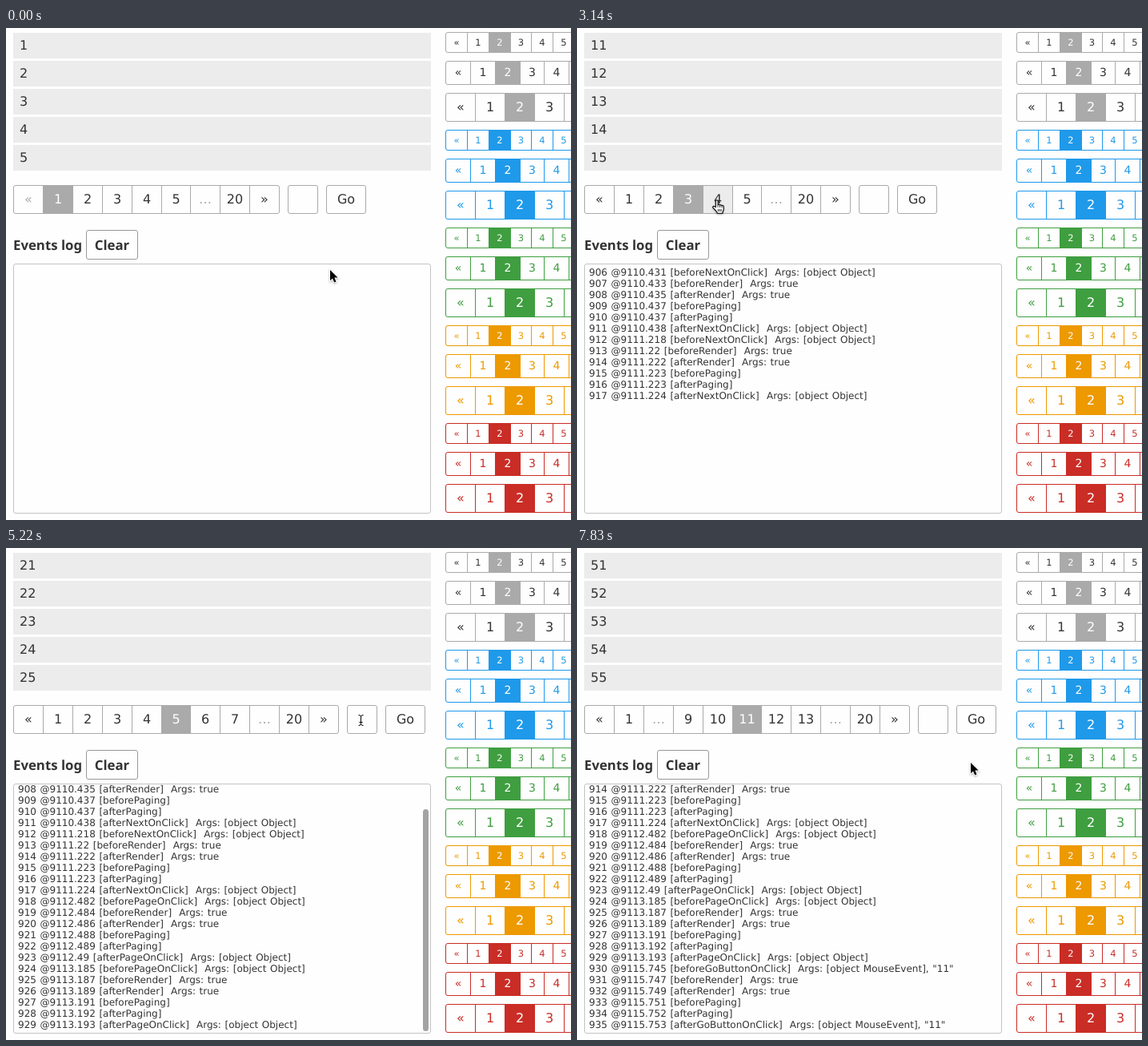
Recreate the animation shown at these times as an HTML page. Size 706 by 614 pixels, loop 8000 ms.

```html
<!DOCTYPE html>
<html lang="en">
<head>
<meta charset="utf-8">
<title>Pagination demo</title>
<style>
  html, body { margin: 0; width: 100%; height: 100%; overflow: hidden; background: #fefefe; }
  body { position: relative; color: #333; font: 16px "DejaVu Sans", sans-serif; text-rendering: geometricPrecision; }
  body * { box-sizing: border-box; }
  .abs, .row, .pager, .cell, .box { position: absolute; }
  .row { left: 9px; width: 522px; height: 32px; padding-left: 8px; line-height: 32px; background: #ececec; }
  .pager { --tone: #aaa; border: 1px solid var(--tone); border-radius: 3px; overflow: hidden; }
  .cell { top: 0; height: 100%; border-left: 1px solid var(--tone); text-align: center; }
  .cell:first-child { border-left-color: transparent; }
  .cell.hover { background: #ececec; }
  .cell.off { color: #aaa; }
  .cell.on { background: var(--tone); color: #fff; }
  .box { border: 1px solid #aaa; border-radius: 3px; text-align: center; }
  #input, #go { top: 196px; height: 36px; line-height: 34px; }
  #input { width: 38px; color: #000; }
  #go { width: 50px; }
  #go.hover { background: #fafafa; }
  .bold { font: bold 16.8px "Noto Sans", sans-serif; }
  #title { left: 9px; top: 252px; line-height: 37px; white-space: nowrap; }
  #clear { left: 100px; top: 252px; width: 65px; height: 37px; line-height: 35px; border-color: #999; }
  #log { left: 9px; top: 294px; width: 522px; height: 312px; overflow: hidden; text-align: left; border-color: #c4c4c4; }
  #lines { left: 5px; top: 3px; margin: 0; font: 12px/14px "DejaVu Sans", sans-serif; word-spacing: .8px; }
  #thumb { left: 521px; width: 7px; border-radius: 4px; background: #777; }
  #cursor { left: 0; top: 0; width: 20px; height: 24px; overflow: visible; }
  .shadow { filter: drop-shadow(0 1px 1px rgba(0,0,0,.3)); }
</style>
</head>
<body>
<div id="rows"></div>
<div id="pager" class="pager"></div>
<div id="input" class="box"></div>
<div id="go" class="box">Go</div>
<div id="title" class="abs bold">Events log</div>
<div id="clear" class="box bold">Clear</div>
<div id="log" class="box"><pre id="lines" class="abs"></pre></div>
<div id="thumb" class="abs"></div>
<div id="themes"></div>
<svg id="cursor" class="abs">
  <path data-kind="arrow" class="shadow" d="M0 0v13.2l3-2.8 2.2 5 2.3-1-2.1-4.9h4.2z" stroke="#fff" stroke-width="2" paint-order="stroke"/>
  <g data-kind="hand" class="shadow" transform="translate(-5 -1)" stroke="#000" stroke-width="1.1" stroke-linejoin="round">
    <path fill="#fff" d="M4.3 9.6V2.2a1.4 1.4 0 0 1 2.8 0V6.8c.5-.8 2.2-.7 2.5.3.6-.7 2-.5 2.4.6.8-.6 2.2-.1 2.2 1.3v3c0 2.4-1.4 3-1.4 5.2H6.3C5.9 15.2 2.6 12.4.9 10.2c-.8-1.3.8-2.3 1.9-1.5z"/>
    <path fill="none" d="M7.1 6.8v3M9.6 7.2v2.8M12 7.8v2.4M7.4 12v3M9.3 12v3M11.2 12v3" stroke-width=".8"/>
  </g>
  <path data-kind="beam" fill="none" stroke="#000" d="M-2.5-6.5q3 0 3 2v9q0 2-3 2M3.5-6.5q-3 0-3 2v9q0 2 3 2M-1.5 2.5h4"/>
</svg>
<script>
const LOOP = 8000, STEP = 150, PITCH = 36.9, LAST = 20;
const $ = id => document.getElementById(id);

// time, page, control, first log stamp in ms, duration in ms
const clicks = [
  [1340, 2, 'Next', 9110431, 7],
  [2090, 3, 'Next', 9111218, 6],
  [3440, 4, 'Page', 9112482, 8],
  [4180, 5, 'Page', 9113185, 8],
  [6840, 11, 'GoButton', 9115745, 8]
];

// start, end, target x, target y, downward bend
const moves = [
  [450, 1040, 327, 219, 0],
  [2690, 3140, 174, 215, 22],
  [3590, 3890, 207, 217, 0],
  [4330, 5220, 443, 215, 20],
  [6120, 6550, 503, 231, 0],
  [7140, 7580, 492, 268, 0]
];

// when the scrollbar appears and when it has faded out
const scrolls = [[4180, 5520], [6840, 7830]];
const FADE = 450;

const ENTRY = '11', TYPE_START = 5820, TYPE_END = 6840;

function cursorAt(t) {
  let x = 405, y = 302;
  for (const [start, end, toX, toY, bend] of moves) {
    if (t < start) break;
    const count = Math.round((end - start) / STEP) + 1;
    const p = Math.min(1, (Math.floor((t - start + 10) / STEP) + 1) / count);
    const eased = Math.sin(p * Math.PI / 2);
    x += (toX - x) * eased;
    y += (toY - y) * eased + bend * Math.sin(p * Math.PI);
  }
  return [Math.round(x), Math.round(y)];
}

function typedAt(t) {
  if (t < TYPE_START || t >= TYPE_END) return '';
  return ENTRY.slice(0, Math.floor((t - TYPE_START) / STEP) + 1);
}

function thumbOpacity(t) {
  const span = scrolls.find(([start, end]) => t >= start && t < end);
  if (!span) return 0;
  const left = Math.ceil((span[1] - t) / STEP) * STEP;
  return Math.min(1, left / FADE);
}

function labels(page) {
  const first = Math.max(1, page - 2), end = Math.max(5, page + 2);
  const list = ['«'];
  if (first > 3) list.push(1, '…');
  else for (let i = 1; i < first; i++) list.push(i);
  for (let i = first; i <= end; i++) list.push(i);
  return list.concat('…', LAST, '»');
}

function cells(list, pitch, page, hover) {
  return list.map((text, i) => {
    const x = Math.round(i * pitch), w = Math.round((i + 1) * pitch) - x;
    const off = text === '…' || (text === '«' && page === 1);
    const kind = text === page ? 'on' : off ? 'off' : i === hover ? 'hover' : '';
    return `<div class="cell ${kind}" style="left:${x - 1}px;width:${w}px">${text}</div>`;
  }).join('');
}

function placePager(el, x, y, w, h) {
  el.style.cssText += `;left:${x}px;top:${y}px;width:${w}px;height:${h}px;line-height:${h - 2}px`;
}

function logLines(done) {
  let id = 906;
  return done.flatMap(([, page, name, base, span]) => {
    const args = name === 'GoButton' ? `[object MouseEvent], "${page}"` : '[object Object]';
    const events = [
      [`before${name}OnClick`, args], ['beforeRender', 'true'], ['afterRender', 'true'],
      ['beforePaging'], ['afterPaging'], [`after${name}OnClick`, args]
    ];
    return events.map(([event, arg], i) => {
      const delay = i < 5 ? Math.min(2 * i, span - 1) : span;
      return `${id++} @${(base + delay) / 1000} [${event}]` + (arg ? `  Args: ${arg}` : '');
    });
  });
}

function drawThemes() {
  const tones = ['#aaa', '#1f99ea', '#3f9e40', '#ed9900', '#c92d26'];
  // top, height, cell pitch, font size
  const sizes = [[5, 26, 26.85, 11.5], [41, 30, 30.86, 14], [81, 36, PITCH, 16]];
  tones.forEach((tone, group) => sizes.forEach(([y, h, pitch, font]) => {
    const el = document.createElement('div');
    el.className = 'pager';
    el.style.cssText = `--tone:${tone};font-size:${font}px;color:${group ? tone : '#333'}`;
    placePager(el, 549, y + group * 122, 300, h);
    el.innerHTML = cells(['«', 1, 2, 3, 4, 5, '…'], pitch, 2);
    $('themes').append(el);
  }));
}

let shown = '';
function draw(t) {
  const done = clicks.filter(c => c[0] <= t);
  const page = done.length ? done[done.length - 1][1] : 1;
  const [x, y] = cursorAt(t);
  const text = typedAt(t), opacity = thumbOpacity(t);
  const hidden = t >= TYPE_START && t < TYPE_START + ENTRY.length * STEP;
  const key = [page, x, y, text, opacity, hidden].join();
  if (key === shown) return;
  shown = key;

  const list = labels(page), width = Math.round(list.length * PITCH) + 1;
  const inputX = 9 + width + 10, goX = inputX + 48;
  const over = (left, w) => y >= 196 && y < 232 && x >= left && x < left + w;
  const hover = over(9, width) ? Math.floor((x - 9) / PITCH) : -1;
  const overGo = over(goX, 50);

  $('rows').innerHTML = [1, 2, 3, 4, 5].map(n =>
    `<div class="row" style="top:${n * 35 - 29}px">${(page - 1) * 5 + n}</div>`).join('');
  placePager($('pager'), 9, 196, width, 36);
  $('pager').innerHTML = cells(list, PITCH, page, hover);
  $('input').style.left = inputX + 'px';
  $('input').textContent = text;
  $('go').style.left = goX + 'px';
  $('go').classList.toggle('hover', overGo);

  const lines = logLines(done), content = lines.length * 14 + 6;
  $('lines').textContent = lines.join('\n');
  $('lines').style.top = 3 - Math.max(0, content - 310) + 'px';
  const thumb = Math.round(308 * 310 / (content + 3));
  $('thumb').style.cssText = `top:${603 - thumb}px;height:${thumb}px;opacity:${opacity}`;

  const kind = hover >= 0 && list[hover] !== '…' || overGo ? 'hand' : over(inputX, 38) ? 'beam' : 'arrow';
  for (const el of $('cursor').children) el.style.display = el.dataset.kind === kind ? '' : 'none';
  $('cursor').style.transform = `translate(${x}px,${y}px)`;
  $('cursor').style.visibility = hidden ? 'hidden' : 'visible';
}

function tick() {
  draw(performance.now() % LOOP);
  requestAnimationFrame(tick);
}

drawThemes();
tick();
</script>
</body>
</html>
```
